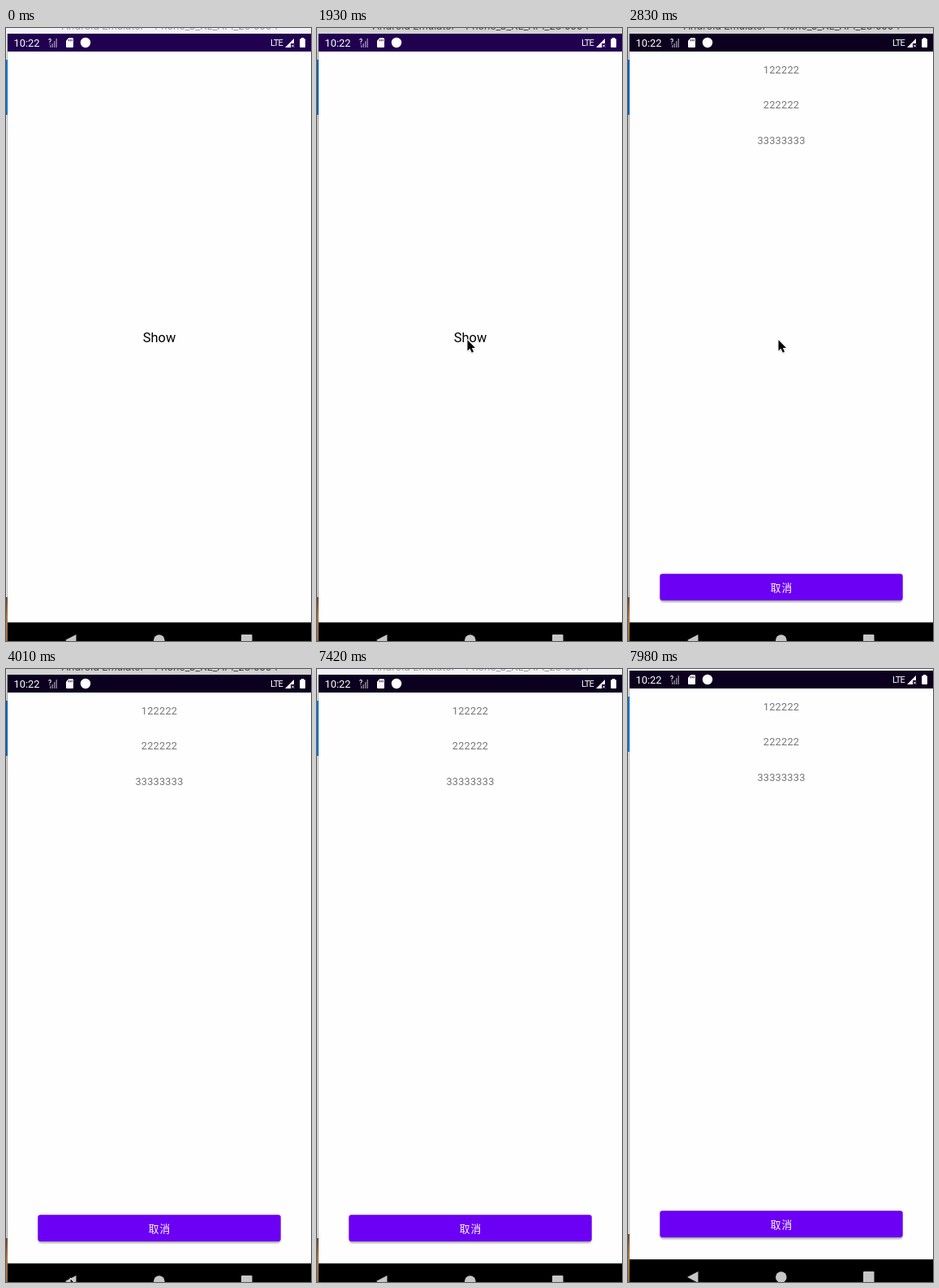
Write an HTML page that moves like this. It is 376x755 px and loops after 8000 ms.

```html
<!DOCTYPE html>
<html lang="en">
<head>
<meta charset="utf-8">
<title>Bottom sheet demo</title>
<style>
  html, body { margin: 0; width: 100%; height: 100%; overflow: hidden; background: #fefefe; }
  svg { display: block; width: 376px; height: 755px; }
  text { font-family: Roboto, sans-serif; }
  .mid { text-anchor: middle; }
  .item { font-size: 12.74px; letter-spacing: .0178em; fill: #757575; }
  #title { font: 12.5px Inter, sans-serif; fill: #9c9c9e; }
  #titleBar { fill: #f2f2f4; }
  #edge { fill: #e4e4e6; }
  #edgeLine { fill: #bcbcbe; }
  #accent { fill: #0a74d2; }
  #status { fill: #210050; }
  .active #title { fill: #444; }
  .active #titleBar { fill: #d3d3d3; }
  .active #edge { fill: #d2d2d2; }
  .active #edgeLine { fill: #a6a6a6; }
  .active #accent { fill: #0063bb; }
  .open #status { fill: #0c001f; }
</style>
</head>
<body>
<svg viewBox="0 0 376 755">
  <defs>
    <linearGradient id="wood" x1="0" y1="0" x2="0" y2="1">
      <stop offset="0" stop-color="#6a4a32"/>
      <stop offset=".3" stop-color="#a87848"/>
      <stop offset="1" stop-color="#8a5c38"/>
    </linearGradient>
    <linearGradient id="lift" x1="0" y1="0" x2="0" y2="1">
      <stop offset="0" stop-color="#d0d0d0"/>
      <stop offset="1" stop-color="#c4c4c4"/>
    </linearGradient>
    <filter id="soft" x="-5%" y="-20%" width="110%" height="150%">
      <feGaussianBlur stdDeviation="1"/>
    </filter>
    <clipPath id="screen"><rect x="2" y="29" width="374" height="760"/></clipPath>
  </defs>

  <g id="scene">
    <!-- window frame -->
    <rect id="titleBar" width="376" height="7"/>
    <text id="title" class="mid" x="202" y="1.5">Android Emulator - Phone_3_XL_API_28:5554</text>
    <rect id="edge" y="7" width="1" height="780"/>
    <rect id="edgeLine" x="1" y="7" width="1" height="780"/>
    <rect id="accent" y="39" width="2" height="68"/>
    <rect y="701" width="2" height="80" fill="url(#wood)"/>

    <!-- app page -->
    <rect id="page" x="2" y="29" width="374" height="704" fill="#fefefe"/>
    <text class="mid" x="189" y="387" font-size="16.4">Show</text>

    <!-- navigation bar -->
    <g id="nav">
      <rect x="2" y="732" width="374" height="60"/>
      <rect x="2" y="732" width="374" height="1" fill="#16261c"/>
      <g fill="#c6c6c6">
        <path d="M73 754L86.5 747V761Z"/>
        <circle cx="188.8" cy="754" r="6.8"/>
        <rect x="290" y="747" width="13.5" height="13.5" rx="1"/>
      </g>
    </g>

    <!-- sheet -->
    <g clip-path="url(#screen)">
      <g id="sheet">
        <rect id="lip" x="2" y="23" width="374" height="6" fill="url(#lift)"/>
        <rect x="2" y="29" width="374" height="703" fill="#fefefe"/>
        <text class="mid item" x="189" y="55.7">122222</text>
        <text class="mid item" x="189" y="99.3">222222</text>
        <text class="mid item" x="189" y="143">33333333</text>
        <rect x="40" y="674" width="298" height="33" rx="3" fill="#000" opacity=".35" filter="url(#soft)"/>
        <rect x="39.3" y="672.3" width="299.4" height="32.7" rx="3" fill="#6c00f4"/>
        <text class="mid" x="189.6" y="693.7" fill="#fff"
          style="font: 12.74px 'Noto Sans CJK SC', 'Noto Sans CJK', sans-serif; letter-spacing: .09em">取消</text>
      </g>
    </g>

    <!-- status bar -->
    <rect id="status" x="2" y="7" width="374" height="22"/>
    <g fill="#fff">
      <text x="9.4" y="23" font-size="12.9">10:22</text>
      <text x="52" y="19.5" font-size="8.5" font-weight="500">?</text>
      <path d="M54 21h1.5v3H54zM56.5 19H58v5h-1.5zM59 16h1.5v8H59zM61.5 13H63v11h-1.5z" opacity=".5"/>
      <path d="M77.3 12.3H82a1 1 0 0 1 1 1V23a1 1 0 0 1-1 1h-7a1 1 0 0 1-1-1v-7.3z"/>
      <path d="M77.3 14v2.3M79.3 14v2.3M81.3 14v2.3" stroke="#210050" stroke-width=".9"/>
      <circle cx="98" cy="18" r="6.2"/>
      <text x="326" y="22" font-size="11" letter-spacing="-.8">LTE</text>
      <path d="M344 24L355 13V19H351V24Z"/>
      <path d="M352 20.5l3 3m0-3l-3 3" stroke="#fff"/>
      <path d="M364 12h3.2v1.3h1a.8.8 0 0 1 .8.8V23.2a.8.8 0 0 1-.8.8h-5.2a.8.8 0 0 1-.8-.8V14.1a.8.8 0 0 1 .8-.8h1z"/>
    </g>
  </g>

  <g id="cursor">
    <path d="M1.5 2V16L4.8 13L7 18L9.6 17L7.6 12H12Z" fill="#000" opacity=".3" filter="url(#soft)"/>
    <path d="M1.5 1.2V14.6L4.6 11.7L6.8 16.8L9 15.8L6.9 11H11Z" stroke="#fff" stroke-width="1.6" paint-order="stroke"/>
  </g>
</svg>
<script>
const LOOP = 8000;
const $ = id => document.getElementById(id);

// [time, x, y]; no position means hidden
const pointer = [
  [0], [450, 307, 753], [600, 223, 530], [740, 191, 442], [890, 181, 399],
  [1040, 181, 394], [1190, 184, 385], [1340, 184, 383],
  [3280, 180, 537], [3430, 174, 670], [3570, 112, 721], [3720, 78, 740],
  [3870, 77, 743], [4010, 78, 750], [4460, 78, 751], [4610, 78, 749],
  [5360, 89, 749], [5500]
];
const focus = [[0, false], [1930, true], [7420, false]];
const sheetY = [[0], [2680, 607], [2830, 0]];
const scroll = [[0, 0], [7840, -2], [7980, -5]];

const at = (steps, t) => steps.findLast(s => s[0] <= t).slice(1);
const move = (id, x, y) => $(id).setAttribute('transform', `translate(${x} ${y})`);
const show = (id, on) => $(id).style.display = on ? '' : 'none';

function draw(t) {
  const [x, y] = at(pointer, t);
  show('cursor', x !== undefined);
  if (x !== undefined) move('cursor', x, y);

  const [drop] = at(sheetY, t);
  const sliding = drop > 0;
  show('sheet', drop !== undefined);
  show('lip', sliding);
  show('nav', !sliding);
  if (drop !== undefined) move('sheet', 0, drop);
  $('page').setAttribute('fill', sliding ? '#d6d6d6' : '#fefefe');

  $('scene').classList.toggle('active', at(focus, t)[0]);
  $('scene').classList.toggle('open', drop === 0);
  move('scene', 0, at(scroll, t)[0]);
}

const start = performance.now();
function tick() {
  draw((performance.now() - start) % LOOP);
  requestAnimationFrame(tick);
}
tick();
</script>
</body>
</html>
```
